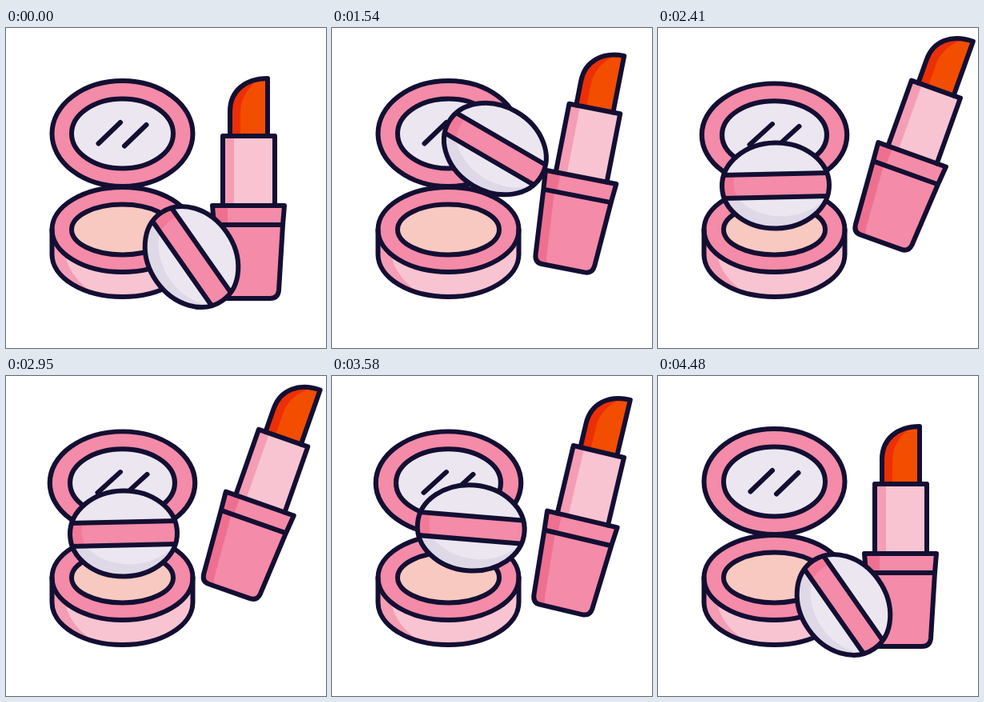
These frames come from a looping animation (400 px wide and 400 px high, 4.51 s). An HTML page:

```html
<!DOCTYPE html>
<html lang="en">
<head>
<meta charset="utf-8">
<title>Make-up</title>
<style>
html, body { margin: 0; width: 100%; height: 100%; overflow: hidden; background: #fff; }
svg { display: block; width: 100vw; height: 100vh; }
.line { fill: none; stroke: #130f33; stroke-width: 6; stroke-linecap: round; stroke-linejoin: round; }
.pink { fill: #f48ba8; }
.rose { fill: #ee7090; }
.pale { fill: #f8c4d2; }
.mid { fill: #f59db4; }
.glass { fill: #ebe6f0; }
.grey { fill: #dfd9e7; }
</style>
</head>
<body>
<svg viewBox="0 0 400 400">
  <defs>
    <clipPath id="pad"><ellipse rx="67" ry="53.5"/></clipPath>
    <clipPath id="side"><path d="M57.5 252V283A88 53 0 0 0 233.5 283V252Z"/></clipPath>
    <clipPath id="tip"><path d="M280 135V104C280 79 299 63 327 63V135Z"/></clipPath>
    <clipPath id="case"><path d="M258 222H348L346 246L341 328Q340 338 330 338H276Q267 338 266 328L260 246Z"/></clipPath>
  </defs>

  <g id="lid">
    <ellipse class="pink" cx="145.5" cy="132" rx="88" ry="66"/>
    <ellipse class="glass" cx="145.5" cy="132" rx="63.5" ry="43.5"/>
    <g class="line">
      <ellipse cx="145.5" cy="132" rx="88" ry="66"/>
      <ellipse cx="145.5" cy="132" rx="63.5" ry="43.5"/>
      <path d="M115.5 144.5L143 118M148 147.5L175.5 121"/>
    </g>
  </g>

  <g>
    <g clip-path="url(#side)">
      <rect class="pale" x="50" y="240" width="190" height="100"/>
      <path class="mid" d="M50 240H74V283C77 304 96 327 122 337L90 345H50Z"/>
    </g>
    <ellipse class="pink" cx="145.5" cy="252" rx="88" ry="53"/>
    <ellipse cx="145.5" cy="252" rx="63.5" ry="31.5" fill="#f8c9c0"/>
    <g class="line">
      <path d="M57.5 252V283A88 53 0 0 0 233.5 283V252"/>
      <ellipse cx="145.5" cy="252" rx="88" ry="53"/>
      <ellipse cx="145.5" cy="252" rx="63.5" ry="31.5"/>
    </g>
  </g>

  <g id="stick">
    <g clip-path="url(#tip)">
      <rect x="278" y="60" width="52" height="78" fill="#f34d00"/>
      <path d="M278 138V60H323C305 70 293 86 293 106V138Z" fill="#ec2f04"/>
    </g>
    <rect class="pale" x="271" y="135" width="65" height="87"/>
    <rect class="mid" x="271" y="135" width="14" height="87"/>
    <g clip-path="url(#case)">
      <rect class="pink" x="250" y="220" width="100" height="120"/>
      <path class="rose" d="M250 222H277V246H274L280 328Q281 336 286 340H250Z"/>
    </g>
    <g class="line">
      <path d="M280 135V104C280 79 299 63 327 63V135"/>
      <path d="M271 222V135H336V222"/>
      <path d="M258 222H348L346 246L341 328Q340 338 330 338H276Q267 338 266 328L260 246ZM260 246H346"/>
    </g>
  </g>

  <g id="puff">
    <g clip-path="url(#pad)">
      <rect class="glass" x="-70" y="-60" width="140" height="120"/>
      <rect class="grey" x="-70" y="14" width="140" height="46"/>
      <ellipse class="glass" cx="8" cy="-15" rx="67" ry="53.5"/>
      <rect x="-70" y="-14.5" width="140" height="29" fill="#f27a98"/>
      <path class="pink" d="M-51 -14.5Q-55 0 -48 14.5H70V-14.5Z"/>
      <path class="line" d="M-70 -14.5H70M-70 14.5H70"/>
    </g>
    <ellipse class="line" rx="67" ry="53.5"/>
  </g>
</svg>
<script>
const LOOP = 4510;
const [lid, stick, puff] = ["lid", "stick", "puff"].map(id => document.getElementById(id));

const REST = [232, 286], DOWN = [147, 197];
const outPath = [REST, [229, 128], [172, 96], DOWN];
const backPath = [DOWN, [245, 176], [215, 130], REST];

const ramp = (t, a, b) => Math.min(1, Math.max(0, (t - a) / (b - a)));
const ease = (t, a, b) => (1 - Math.cos(Math.PI * ramp(t, a, b))) / 2;
const mix = (a, b, k) => a + (b - a) * k;

function along(path, s) {
  const r = 1 - s, w = [r * r * r, 3 * r * r * s, 3 * r * s * s, s * s * s];
  return [0, 1].map(axis => path.reduce((sum, p, i) => sum + p[axis] * w[i], 0));
}

function draw(t) {
  // lipstick: rises and falls like a thrown object
  const k = Math.max(0, 1 - Math.abs((t - 2632) / 1604) ** 2.08);
  stick.setAttribute("transform",
    `translate(${14.8 * k} ${-64.7 * k}) rotate(${20.06 * k} 303 222)`);

  // puff: arcs over to the powder, rests, returns
  const go = ease(t, 1000, 2170), back = ease(t, 3340, 4490);
  const [x, y] = back > 0 ? along(backPath, back) : along(outPath, go);
  puff.setAttribute("transform",
    `translate(${x} ${y}) rotate(${mix(55, -1.2, go - back)})`);

  // lid: squashes on its hinge
  const q = ease(t, 2095, 2390) - ease(t, 3590, 3900);
  lid.setAttribute("transform",
    `translate(145.5 198) scale(${1 + 0.031 * q} ${1 - 0.025 * q}) translate(-145.5 -198)`);
}

const start = performance.now();
function tick() {
  draw((performance.now() - start) % LOOP);
  requestAnimationFrame(tick);
}
draw(0);
requestAnimationFrame(tick);
</script>
</body>
</html>
```
